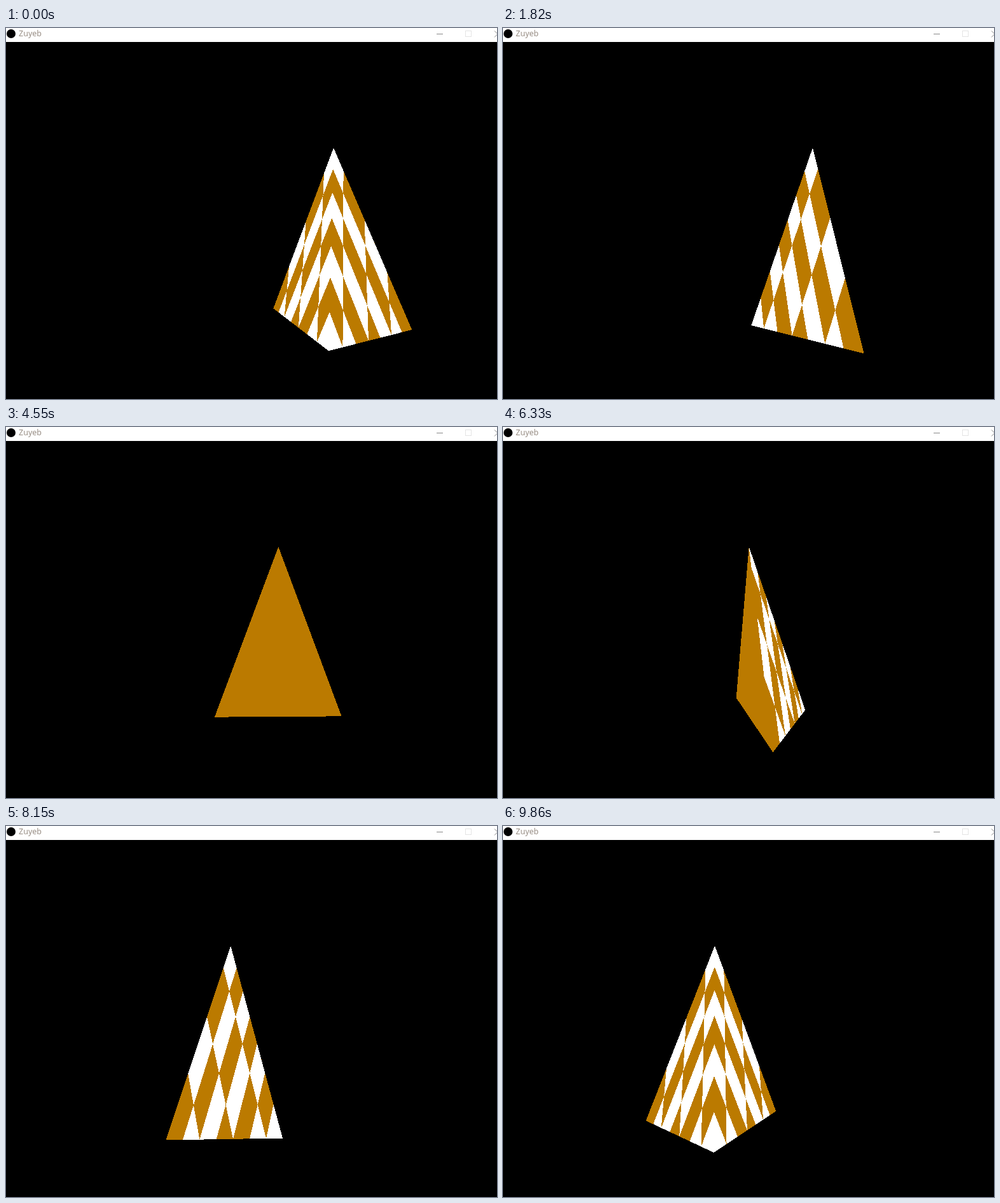
An HTML page that plays this animation: 772x584 px, repeating every 9.93 s.

```html
<!DOCTYPE html>
<html lang="en">
<head>
<meta charset="utf-8">
<title>Spinning pyramid</title>
<style>
  html, body { margin: 0; width: 100%; height: 100%; overflow: hidden; background: #000; }
  svg { display: block; width: 772px; height: 584px; }
  text { font: 12.5px "Noto Sans", sans-serif; fill: #998f86; }
  .crisp { shape-rendering: crispEdges; }
</style>
</head>
<body>
<svg viewBox="0 0 772 584">
  <rect width="772" height="584"/>
  <rect width="772" height="22" fill="#fff"/>
  <circle cx="8" cy="9" r="7"/>
  <text x="20" y="13">Zuyeb</text>
  <g fill="none">
    <path class="crisp" d="M677 9.5h10" stroke="#888"/>
    <path class="crisp" d="M722.5 4.5h9v9h-9z" stroke="#e4e4e4"/>
    <path d="M768 4.5l10 10M768 14.5l10 -10" stroke="#888"/>
  </g>
  <path id="solid" class="crisp" fill="#bb7a00"/>
  <path id="checks" class="crisp" fill="#fff"/>
</svg>
<script>
const LOOP = 9930;
const RADIUS = 100, TOP = -141.5, BASE = 126;   // pixels at the axis depth
const DEPTH = RADIUS / 0.321;
const EYE = { x: 394.5, y: 330 };
const CELLS = 7;

// time in ms, turn in degrees, picture steps since the previous key
const KEYS = [
  [0, 0, 1], [1040, 27.3, 14], [2050, 57.5, 13], [3060, 92, 13],
  [4090, 135, 13], [5090, 178.3, 13], [6100, 220.3, 13], [7190, 260.2, 14],
  [8210, 291.3, 13], [9240, 316, 13], [9860, 325.3, 8]
];
const LAST = KEYS.length - 1;

function slope(i) {
  const a = KEYS[Math.max(i - 1, 0)], b = KEYS[Math.min(i + 1, LAST)];
  return (b[1] - a[1]) / (b[0] - a[0]);
}

// Stepped time, smooth cubic between keys
function turnAt(time) {
  if (time >= KEYS[LAST][0]) return KEYS[LAST][1];
  let i = 0;
  while (time >= KEYS[i + 1][0]) i++;
  const [t0, p0] = KEYS[i], [t1, p1, steps] = KEYS[i + 1];
  const span = t1 - t0;
  const u = Math.floor((time - t0) / span * steps + 0.15) / steps;
  const v = 1 - u;
  return p0 + (p1 - p0) * u * u * (3 - 2 * u)
    + span * u * v * (v * slope(i) - u * slope(i + 1));
}

function corner(deg) {
  const r = deg * Math.PI / 180;
  return [RADIUS * Math.sin(r), BASE, RADIUS * Math.cos(r)];
}

function project([x, y, z], shift) {
  const s = DEPTH / (DEPTH - z);
  return [EYE.x + (shift + x - EYE.x) * s, EYE.y + y * s];
}

const polygon = pts =>
  "M" + pts.map(p => p.map(n => n.toFixed(2)).join(" ")).join("L") + "Z";

const facesViewer = ([p, q, r]) =>
  (q[0] - p[0]) * (r[1] - p[1]) - (q[1] - p[1]) * (r[0] - p[0]) < 0;

// White cells in (a, b), counted along the two slanted edges
function whiteCells() {
  const cells = [];
  for (let a0 = 0; a0 < CELLS; a0++) {
    for (let j = a0 % 2; j < 4; j += 2) {
      const a1 = a0 + 1, b0 = Math.max(0, 2 * j - 1), b1 = 2 * j + 1;
      if (a0 + b0 >= CELLS) continue;
      const edge = a => [a, Math.min(b1, CELLS - a)];
      const bend = Math.min(a1, Math.max(a0, CELLS - b1));
      cells.push([[a0, b0], [a1, b0], edge(a1), edge(bend), edge(a0)]);
    }
  }
  return cells;
}

const WHITE = whiteCells();
const APEX = [0, TOP, 0];
const solid = document.getElementById("solid");
const checks = document.getElementById("checks");

function draw(time) {
  const turn = turnAt(time);
  const shift = 515 - 0.5595 * turn;
  const [front, right, left] = [0, 90, -90].map(d => corner(d - 24.1 - turn));
  const flat = p => project(p, shift);
  let body = "", pattern = "";

  const face = (l, r, checked) => {
    const tri = [APEX, l, r].map(flat);
    if (!facesViewer(tri)) return;
    body += polygon(tri);
    if (!checked) return;
    const other = l === front ? r : l;
    const at = ([a, b]) => flat(APEX.map((p, k) =>
      p + ((front[k] - p) * a + (other[k] - p) * b) / CELLS));
    for (const cell of WHITE) pattern += polygon(cell.map(at));
  };

  face(front, right, true);
  face(left, front, true);
  face(right, left, false);
  solid.setAttribute("d", body);
  checks.setAttribute("d", pattern);
}

function tick() {
  draw(performance.now() % LOOP);
  requestAnimationFrame(tick);
}
tick();
</script>
</body>
</html>
```
